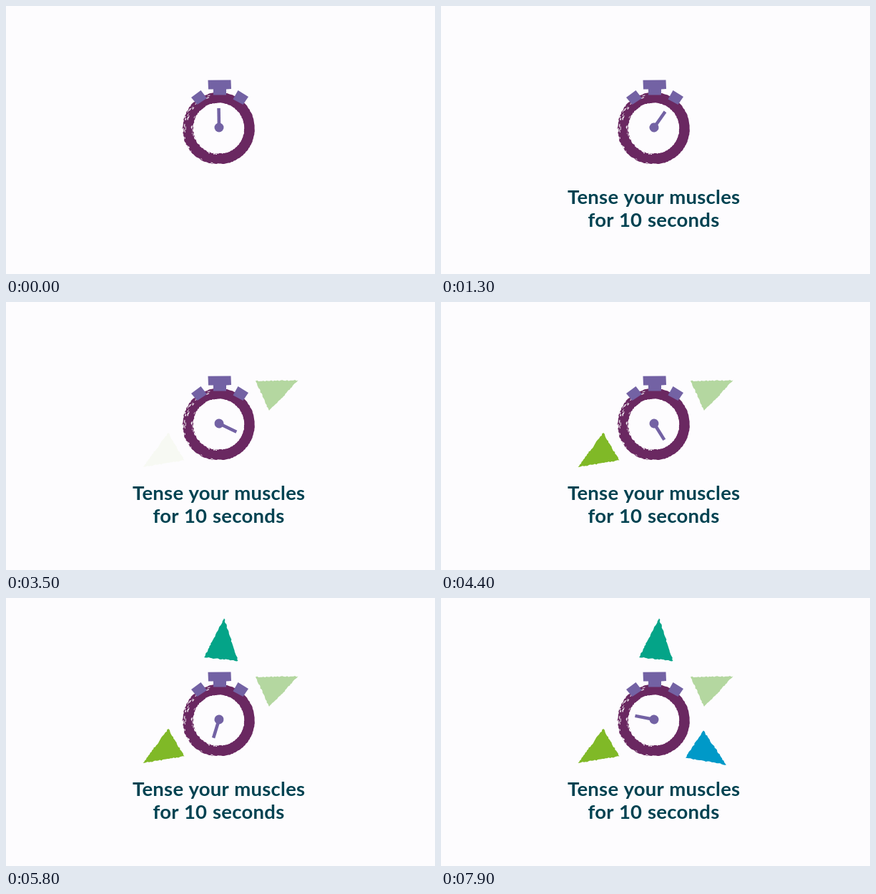
An HTML page that plays this animation: 600 px wide and 375 px high, repeating every 8 s.

```html
<!DOCTYPE html>
<html lang="en">
<head>
<meta charset="utf-8">
<title>Tense your muscles</title>
<style>
  html, body { margin: 0; width: 100%; height: 100%; overflow: hidden; background: #fdfcfe; }
  svg { display: block; width: 100vw; height: 100vh; }
  text {
    font: 700 27.5px Lato, "Open Sans", sans-serif;
    letter-spacing: 0.25px;
    word-spacing: 0.8px;
    fill: #004251;
    text-anchor: middle;
  }
</style>
</head>
<body>
<svg viewBox="0 0 600 375">
  <g id="triangles"></g>
  <path id="ring" fill="#6a2861" fill-rule="evenodd"/>
  <g id="chips" fill="none" stroke="#fdfcfe" stroke-linecap="round"></g>
  <g fill="#7362a4">
    <path d="M282.5 103.8L314.5 103.5L315 116L308 116.5L308 124.5L290 124.5L290 116.5L283 116.5Z"/>
    <path d="M259 128L272.5 118L281 129L267.5 138Z"/>
    <path d="M324.5 118L339 127L331.5 138L317.5 130.5Z"/>
    <g id="hand">
      <path d="M295.3 143H299.8L300.3 170H295.7Z"/>
      <circle cx="298" cy="170" r="6.5"/>
    </g>
  </g>
  <g id="caption">
    <text x="297.7" y="276.5">Tense your muscles</text>
    <text x="297.5" y="309">for 10 seconds</text>
  </g>
</svg>
<script>
const LOOP = 8000, STEP = 100, FADE = 700;
const $ = id => document.getElementById(id);

function add(parent, tag, attrs) {
  const el = document.createElementNS('http://www.w3.org/2000/svg', tag);
  for (const key in attrs) el.setAttribute(key, attrs[key]);
  return parent.appendChild(el);
}

function seeded(seed) {
  return () => (seed = seed * 16807 % 2147483647) / 2147483647;
}

const line = points => 'M' + points.map(p => p.map(v => v.toFixed(1)).join(' ')).join('L');
const shape = points => line(points) + 'Z';

// Polygon whose sides are broken into small uneven pieces
function ragged(corners, rand, amount) {
  const points = [];
  corners.forEach(([x, y], i) => {
    const [nx, ny] = corners[(i + 1) % corners.length];
    const length = Math.hypot(nx - x, ny - y);
    const count = Math.round(length / 2.2);
    points.push([x, y]);
    for (let k = 1; k < count; k++) {
      const off = (rand() - 0.5) * amount;
      points.push([
        x + (nx - x) * k / count - (ny - y) / length * off,
        y + (ny - y) * k / count + (nx - x) / length * off
      ]);
    }
  });
  return shape(points);
}

const CX = 297.5, CY = 171.3;
const polar = (r, degrees) => {
  const a = degrees * Math.PI / 180;
  return [CX + r * Math.cos(a), CY + r * Math.sin(a)];
};

// Circle with an uneven edge, rougher on the left and flat at the bottom
function brushCircle(radius, floor, rand) {
  const points = [];
  for (let d = 0; d < 360; d += 2.4) {
    const left = Math.max(0, -Math.cos(d * Math.PI / 180));
    const [x, y] = polar(radius + (rand() - 0.5) * (0.7 + 1.1 * left), d);
    points.push([x, Math.min(y, floor + rand())]);
  }
  return shape(points);
}

const rand = seeded(4217);
$('ring').setAttribute('d', brushCircle(50.4, 220, rand) + brushCircle(35.8, 205.8, rand));

// Short bare strokes running along the ring, scattered over a range of angles
function scratch(count, radius, depth, from, to, span) {
  for (let i = 0; i < count; i++) {
    const d = from + rand() * (to - from), r = radius + rand() * depth;
    const length = span * (0.3 + rand());
    add($('chips'), 'path', {
      d: line([polar(r, d), polar(r + rand() - 0.5, d + length / 2), polar(r, d + length)]),
      'stroke-width': 0.6 + rand() * 0.9
    });
  }
}
scratch(24, 45, 5, 172, 252, 4);
scratch(8, 36, 2, 150, 205, 4);
scratch(6, 49, 1.5, 70, 165, 2);
scratch(5, 35.5, 1.5, 65, 135, 2);

const triangles = [
  { start: 1900, fill: '#b4d7a0', corners: [[349, 110.5], [408.5, 109.5], [388, 132], [368, 152]] },
  { start: 3400, fill: '#80b927', corners: [[227, 183], [249.5, 221.5], [191.5, 231]] },
  { start: 4900, fill: '#04a488', corners: [[305, 28.5], [324.5, 88], [277, 83]] },
  { start: 6400, fill: '#0099c8', corners: [[367, 185.5], [399, 233.5], [342, 223.5]] }
];
triangles.forEach((t, i) => {
  t.el = add($('triangles'), 'path', { fill: t.fill, d: ragged(t.corners, seeded(91 + i * 57), 1.4) });
});

// Time in ms, hand angle in degrees
const turn = [[0, 0], [200, 1.5], [400, 5], [600, 11], [1300, 36], [2600, 84.5],
  [4400, 149], [5800, 198], [7900, 282], [8000, 286]];

function angleAt(time) {
  const i = turn.findIndex(p => p[0] > time);
  const [t0, a0] = turn[i - 1], [t1, a1] = turn[i];
  return a0 + (a1 - a0) * (time - t0) / (t1 - t0);
}

function fade(time, start, length) {
  const p = Math.min(1, Math.max(0, (time - start) / length));
  return (1 - Math.cos(p * Math.PI)) / 2;
}

function draw() {
  const time = Math.floor(performance.now() % LOOP / STEP) * STEP;
  $('hand').setAttribute('transform', `rotate(${angleAt(time)} 298 170)`);
  $('caption').setAttribute('opacity', fade(time, 0, 1000));
  for (const t of triangles) t.el.setAttribute('opacity', fade(time, t.start, FADE));
  requestAnimationFrame(draw);
}
draw();
</script>
</body>
</html>
```
